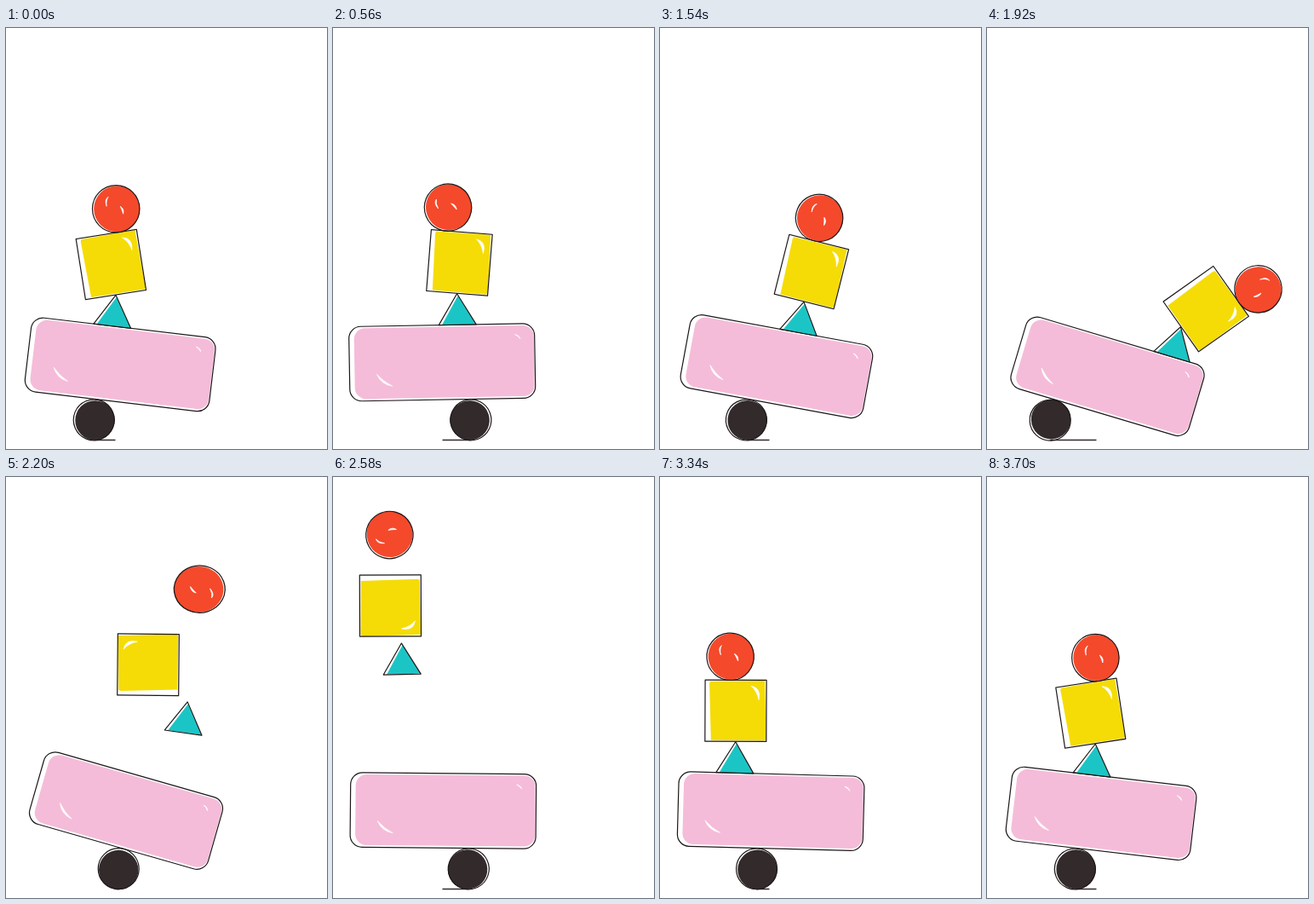
Animation of 377x494 px, one loop 3.72 s. Source, as an HTML page without scripts:

```html
<!DOCTYPE html>
<html lang="en">
<head>
<meta charset="utf-8">
<title>Balancing shapes</title>
<style>
/* Stack state: ball position, tilts, slides and spins */
@property --ball { syntax: "<number>"; inherits: true; initial-value: 103.5; }
@property --tilt { syntax: "<angle>"; inherits: true; initial-value: 0deg; }
@property --slide { syntax: "<number>"; inherits: true; initial-value: 0; }
@property --tip { syntax: "<angle>"; inherits: true; initial-value: 0deg; }
@property --lean { syntax: "<angle>"; inherits: true; initial-value: 0deg; }
@property --roll { syntax: "<number>"; inherits: true; initial-value: 0; }
@property --spin { syntax: "<angle>"; inherits: true; initial-value: 0deg; }
/* Flight state: --air is 1 while the shapes are thrown */
@property --air { syntax: "<number>"; inherits: true; initial-value: 0; }
@property --wide { syntax: "<number>"; inherits: true; initial-value: 1; }
@property --tri-fx { syntax: "<number>"; inherits: true; initial-value: 0; }
@property --tri-fy { syntax: "<number>"; inherits: true; initial-value: 0; }
@property --sq-fx { syntax: "<number>"; inherits: true; initial-value: 0; }
@property --sq-fy { syntax: "<number>"; inherits: true; initial-value: 0; }
@property --red-fx { syntax: "<number>"; inherits: true; initial-value: 0; }
@property --red-fy { syntax: "<number>"; inherits: true; initial-value: 0; }

html, body { margin: 0; width: 100%; height: 100%; overflow: hidden; background: #fff; }

svg {
  display: block; width: 377px; height: 494px;
  animation: base 3720ms linear infinite, stack 3720ms linear infinite,
    air 3720ms step-end infinite, drift 3720ms linear infinite, toss 3720ms linear infinite;

  /* Each shape rests on the one below */
  --slab-y: calc(460 - 24.5 / cos(var(--tilt)) + (129 - var(--ball)) * tan(var(--tilt)));
  --tri-x: calc(129 + 87.5 * sin(var(--tilt)) + var(--slide) * cos(var(--tilt)));
  --tri-y: calc(var(--slab-y) - 87.5 * cos(var(--tilt)) + var(--slide) * sin(var(--tilt)) + 21.75 * sin(var(--tip)));
  --sq-x: calc(var(--tri-x) + 36.5 * sin(var(--tilt) + var(--tip)) + 36.5 * sin(var(--lean)));
  --sq-y: calc(var(--tri-y) - 36.5 * cos(var(--tilt) + var(--tip)) - 36.5 * cos(var(--lean)));
  --red-x: calc(var(--sq-x) + 63.5 * sin(var(--lean)) + var(--roll) * cos(var(--lean)));
  --red-y: calc(var(--sq-y) - 63.5 * cos(var(--lean)) + var(--roll) * sin(var(--lean)));
}

.track { transform: translate(128.5px, 483.5px) scaleX(calc(var(--ball) - 128.5)); }
.ball { transform: translate(calc(var(--ball) * 1px), 460px) rotate(calc((var(--ball) - 132) / 24 * 1rad)); }
.slab { transform: translate(129px, calc(var(--slab-y) * 1px)) rotate(var(--tilt)); }
.tri, .sq, .red {
  --mix-x: calc((var(--x) * (1 - var(--air)) + var(--fx) * var(--air)) * 1px);
  --mix-y: calc((var(--y) * (1 - var(--air)) + var(--fy) * var(--air)) * 1px);
}
.tri {
  --x: var(--tri-x); --y: var(--tri-y); --fx: var(--tri-fx); --fy: var(--tri-fy);
  transform: translate(var(--mix-x), var(--mix-y)) rotate(calc(var(--tilt) + var(--tip)));
}
.sq {
  --x: var(--sq-x); --y: var(--sq-y); --fx: var(--sq-fx); --fy: var(--sq-fy);
  transform: translate(var(--mix-x), var(--mix-y)) rotate(var(--lean));
}
.red {
  --x: var(--red-x); --y: var(--red-y); --fx: var(--red-fx); --fy: var(--red-fy);
  transform: translate(var(--mix-x), var(--mix-y)) scaleX(var(--wide)) rotate(var(--spin));
}

.ink { fill: none; stroke: #1c1718; stroke-width: 1.2; stroke-linejoin: round; }
.shine { fill: #fff; stroke: #fff; stroke-width: .7; stroke-linejoin: round; }

@keyframes base {
  0%, 100% { --ball: 103.5; --tilt: 6.8deg; }
  4.03% { --ball: 109; --tilt: 6.2deg; }
  8.06% { --ball: 125; --tilt: 4deg; }
  12.1% { --ball: 147; --tilt: 1deg; }
  15.05% { --ball: 161.5; --tilt: -1deg; }
  18.8% { --ball: 172; --tilt: -3deg; }
  22.85% { --ball: 176; --tilt: -4deg; }
  26.9% { --ball: 174; --tilt: -3.4deg; }
  30.65% { --ball: 165.5; --tilt: -2deg; }
  34.95% { --ball: 143; --tilt: 2deg; }
  39% { --ball: 115; --tilt: 7.5deg; }
  43.55% { --ball: 90; --tilt: 13deg; }
  47.85% { --ball: 79; --tilt: 15.3deg; }
  51.61% { --ball: 74.5; --tilt: 16.6deg; }
  54.3% { --ball: 66; --tilt: 19deg; }
  55.9% { --ball: 70; --tilt: 19deg; }
  59.14% { --ball: 132; --tilt: 16deg; }
  61.8% { --ball: 152; --tilt: 11deg; }
  65.86% { --ball: 160; --tilt: 5deg; }
  69.4% { --ball: 159; --tilt: .5deg; }
  72.6% { --ball: 156; --tilt: -2.5deg; }
  75.3% { --ball: 152; --tilt: -6.5deg; }
  80.11% { --ball: 140; --tilt: -4deg; }
  84.7% { --ball: 127; --tilt: -2deg; }
  87.6% { --ball: 119; --tilt: -.5deg; }
  91.4% { --ball: 110; --tilt: 3deg; }
  95.4% { --ball: 105; --tilt: 5.8deg; }
}

@keyframes stack {
  0% { --slide: -14.8; --tip: 0deg; --lean: -9deg; --roll: 16; --spin: 0deg; }
  8.06% { --slide: 6; --lean: -2deg; --roll: 1; }
  12.1% { --slide: 15; }
  15.05% { --slide: 18.8; --lean: 4.5deg; --roll: -18.4; --spin: -22deg; }
  18.8% { --slide: 18; --lean: 5deg; --roll: -26; }
  22.85% { --slide: 10; --lean: 1.5deg; }
  25.5% { --tip: 0deg; }
  26.9% { --slide: -1; --lean: -4deg; --roll: -34; }
  30.65% { --slide: -11.5; --tip: -6deg; --lean: -8.2deg; --roll: -35.6; --spin: -28deg; }
  33.3% { --slide: -14; --lean: -8deg; --roll: -33; }
  35% { --tip: 0deg; }
  37.6% { --slide: -4; --lean: 0deg; --roll: -22; --spin: 0deg; }
  43.55% { --slide: 30; --lean: 22deg; --roll: 2; --spin: 36deg; }
  47.85% { --slide: 52; --lean: 40deg; --roll: 12; }
  51.61% { --slide: 65.6; --lean: 54.7deg; --roll: 16.3; --spin: 85deg; }
  54.3% { --slide: 72; --tip: 0deg; --lean: 60deg; --roll: 20; --spin: 110deg; }
  59.14% { --tip: -8deg; --lean: -89deg; --spin: 161deg; }
  65.86% { --tip: -3deg; --lean: -210deg; }
  74.46% { --slide: -68; --tip: 0deg; --lean: -357deg; --roll: -10; --spin: 348deg; }
  76.6% { --lean: -352deg; --roll: -22; }
  80.11% { --slide: -66; --lean: -352.8deg; --roll: -26.4; --spin: 350deg; }
  84.7% { --slide: -58; --lean: -354deg; --roll: -22; }
  90% { --slide: -43; --lean: -360deg; --roll: -6; }
  95.4% { --slide: -28; --lean: -366deg; --roll: 10; }
  100% { --slide: -14.8; --tip: 0deg; --lean: -369deg; --roll: 16; --spin: 360deg; }
}

@keyframes air {
  0%, 74.46%, 100% { --air: 0; }
  54.3% { --air: 1; }
}

@keyframes drift {
  0%, 54.3% { --tri-fx: 225.6; --sq-fx: 269.6; --red-fx: 334.6; --wide: 1; }
  55.9% { --sq-fx: 256; --red-fx: 317; }
  56.45% { --tri-fx: 224; }
  57.5% { --sq-fx: 215; --red-fx: 286; }
  59.14% { --tri-fx: 208.5; --sq-fx: 167.5; --red-fx: 228; --wide: 1.08; }
  61.8% { --tri-fx: 170; --sq-fx: 120; --red-fx: 160; }
  64.5% { --tri-fx: 130; --sq-fx: 94; --red-fx: 113; --wide: 1; }
  68.5% { --tri-fx: 86; --sq-fx: 70; --red-fx: 70; }
  74.46%, 100% { --tri-fx: 53.7; --sq-fx: 52.4; --red-fx: 45.7; --wide: 1; }
}

@keyframes toss {
  0% { --tri-fy: 396.5; --sq-fy: 343; --red-fy: 328.6; }
  54.3% { --red-fy: 328.6; animation-timing-function: cubic-bezier(.33, .67, .67, 1); }
  55.9% { --sq-fy: 343; animation-timing-function: cubic-bezier(.33, .67, .67, 1); }
  56.45% { --tri-fy: 396.5; animation-timing-function: cubic-bezier(.33, .67, .67, 1); }
  65.7% { --tri-fy: 205; --sq-fy: 123; --red-fy: 36; animation-timing-function: cubic-bezier(.33, 0, .67, .33); }
  74.46%, 100% { --tri-fy: 355.9; --sq-fy: 282; --red-fy: 218; }
}
</style>
</head>
<body>
<svg viewBox="0 0 377 494" xmlns="http://www.w3.org/2000/svg">
  <rect class="track" y="-.75" width="1" height="1.5" fill="#332a2b"/>

  <g class="ball">
    <circle cy="1" r="23.2" fill="#332a2b"/>
    <circle class="ink" cy="-.3" r="24"/>
  </g>

  <g class="slab">
    <rect x="-103" y="-85.5" width="211" height="83" rx="13" fill="#f5bcd9"/>
    <rect class="ink" x="-109" y="-87.5" width="218" height="87.5" rx="14" stroke-width="1"/>
    <path class="shine" d="M-77-31Q-72-19-59-17Q-69-22-77-31Z"/>
    <path class="shine" d="M86-75Q91-74 92-70Q90-73 86-75Z"/>
  </g>

  <g class="tri">
    <path d="M1-34L-18-.5H21.5Z" fill="#1cc5c5"/>
    <path class="ink" d="M0-36.5L-22 0H22Z"/>
  </g>

  <g class="sq">
    <path d="M-30-34.5L34-35.5L36 33Q35 35 33 35L-29 34.5L-31-32Z" fill="#f5dc07"/>
    <rect class="ink" x="-36" y="-36" width="72" height="72"/>
    <path class="shine" d="M18-29Q30-27 27-13Q25-23 18-29Z"/>
  </g>

  <g class="red">
    <circle cx="1" r="27" fill="#f5492b"/>
    <circle class="ink" r="27.7"/>
    <path class="shine" d="M-11-3Q-14-11-9-14Q-12-10-11-3Z"/>
    <path class="shine" d="M5-3Q10 0 8.500 6Q7 1 5-3Z"/>
  </g>
</svg>
</body>
</html>
```
